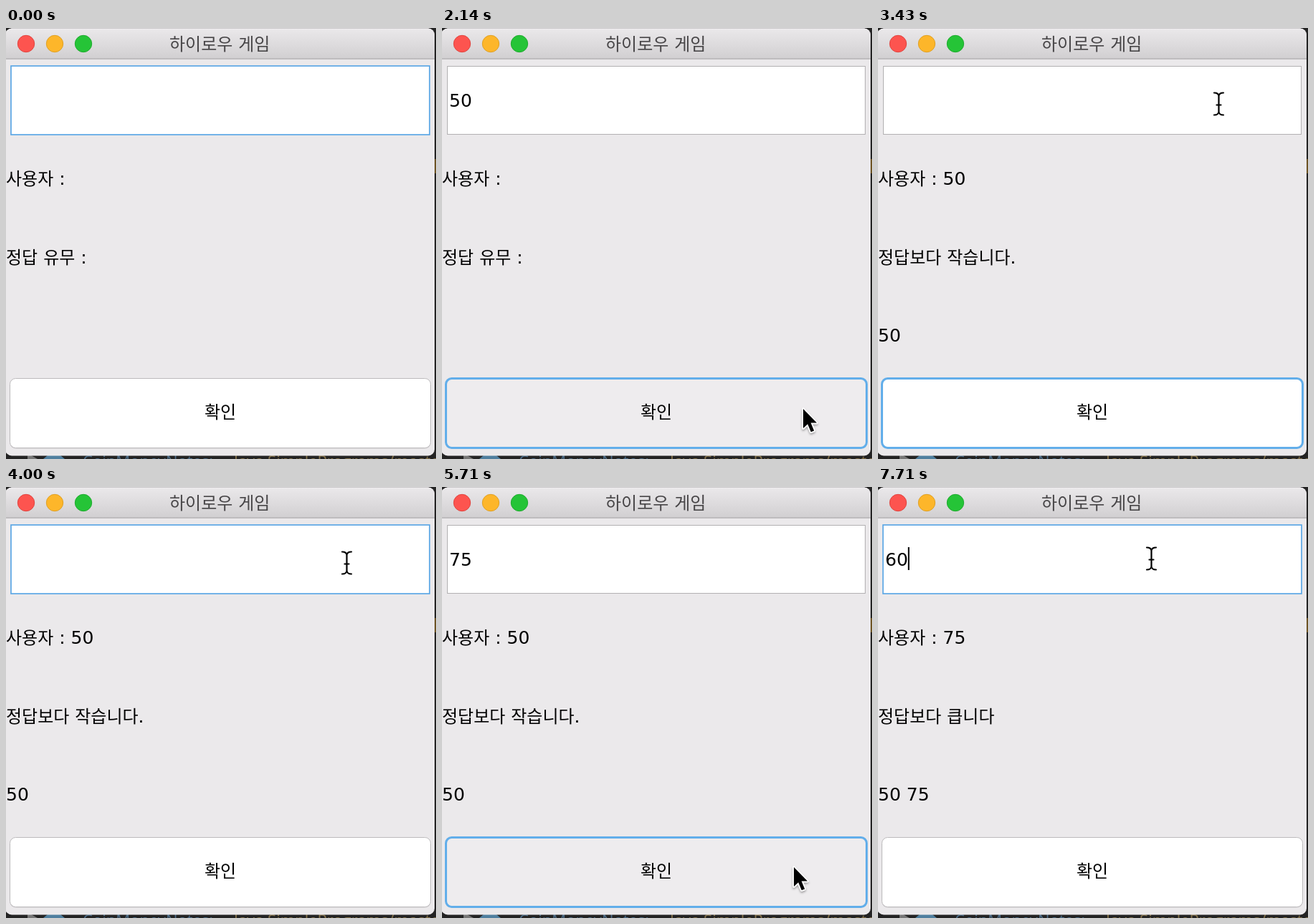
Recreate the animation shown at these times as an HTML page. Size 600x602 px, loop 8000 ms.

```html
<!DOCTYPE html>
<html lang="ko">
<head>
<meta charset="utf-8">
<title>하이로우 게임</title>
<style>
  html, body { margin: 0; width: 100%; height: 100%; overflow: hidden; background: #232323; }
  svg { display: block; }
  text { font: 25px "DejaVu Sans", "Noto Sans CJK KR", sans-serif; white-space: pre; }
  .ko { font: 24px "Noto Sans CJK KR", "Noto Sans CJK", sans-serif; }
  .behind { font: 22px "Open Sans", sans-serif; }
</style>
</head>
<body>
<svg width="600" height="602" viewBox="0 0 600 602">
  <defs>
    <linearGradient id="bar" x1="0" y1="0" x2="0" y2="1">
      <stop offset="0" stop-color="#ebe9eb"/>
      <stop offset="1" stop-color="#d1cfd1"/>
    </linearGradient>
    <clipPath id="win"><rect x="-1" y="0.5" width="599" height="597" rx="9"/></clipPath>
    <filter id="soft" x="-50%" y="-50%" width="200%" height="200%">
      <feDropShadow dx="0" dy="2" stdDeviation="1.5" flood-opacity="0.35"/>
    </filter>
  </defs>

  <!-- desktop showing behind the window -->
  <rect width="600" height="602" fill="#232323"/>
  <rect x="598" y="183" width="2" height="20" fill="#6d5424"/>
  <path d="M30 594l14 8l-14 8z" fill="#777"/>
  <path d="M52 602l6-5h18l6 5z" fill="#4f7f9f"/>
  <text class="behind" x="107" y="613" fill="#4c6c88">CoinMoneyNotes:</text>
  <text class="behind" x="318" y="613" fill="#84714a">Java SimplePrograms/master</text>

  <g clip-path="url(#win)">
    <rect width="600" height="602" fill="#ebe9eb"/>
    <rect width="600" height="43" fill="url(#bar)"/>
    <rect y="42.5" width="600" height="1.2" fill="#acaaac"/>
    <rect y="0.5" width="600" height="1" fill="#f5f3f5"/>
  </g>
  <g stroke-width="1">
    <circle cx="28" cy="22" r="11.7" fill="#fd544f" stroke="#e0443f"/>
    <circle cx="68" cy="22" r="11.7" fill="#fdb62a" stroke="#dfa023"/>
    <circle cx="108" cy="22" r="11.7" fill="#25c437" stroke="#1dab2d"/>
  </g>
  <text id="title" x="228" y="31" fill="#474547"></text>

  <rect id="field" fill="#fff"/>
  <text id="entry" x="10" y="110"></text>
  <rect id="caret" y="84" width="2" height="32"/>

  <text id="user" x="0" y="219"></text>
  <text id="verdict" x="0" y="329"></text>
  <text id="history" x="0" y="438"></text>

  <rect x="5.5" y="490.5" width="587" height="97" rx="8" fill="#cfcdcf"/>
  <rect id="button" x="5.5" y="489.5" width="587" height="97" rx="8"/>
  <text id="ok" x="277" y="545"></text>

  <g id="arrow" filter="url(#soft)">
    <path d="M1 1V28L7.2 22.3L11.8 33.2L16.2 31.4L11.6 20.6H20Z"
      stroke="#fff" stroke-width="3.4" stroke-linejoin="round" paint-order="stroke"/>
  </g>
  <g id="beam" fill="none" stroke-linecap="round">
    <path id="beamPath" stroke="#fff" stroke-width="4.6"
      d="M-6.5 -15.5Q-0.5 -15.5 0 -11Q0.5 -15.5 6.5 -15.5M0 -11V11M-6.5 15.5Q-0.5 15.5 0 11Q0.5 15.5 6.5 15.5M-3 1.5H3"/>
    <use href="#beamPath" id="beamInk"/>
    <path stroke="#000" stroke-width="2.2"
      d="M-6.5 -15.5Q-0.5 -15.5 0 -11Q0.5 -15.5 6.5 -15.5M0 -11V11M-6.5 15.5Q-0.5 15.5 0 11Q0.5 15.5 6.5 15.5M-3 1.5H3"/>
  </g>
</svg>
<script>
const LOOP = 8000, RATE = 7 / 1000;   // the picture advances seven times a second
const $ = id => document.getElementById(id);
const set = (el, attrs) => { for (const k in attrs) el.setAttribute(k, attrs[k]); };
const show = (el, on) => set(el, { visibility: on ? 'visible' : 'hidden' });
const write = (id, s) => {
  $(id).innerHTML = s.replace(/[가-힣]+/g, '<tspan class="ko">$&</tspan>');
};

// Each list holds [tick, value], valid until the next entry.
const entry = [[0, ''], [4, '5'], [6, '50'], [16, ''], [33, '7'], [34, '75'],
  [41, ''], [53, '6'], [54, '60']];
const caret = [[0, 0], [1, 1], [9, 0], [12, 1], [15, 0], [25, 1], [28, 0], [32, 1],
  [38, 0], [40, 0], [49, 1]];
const focus = [[0, 'field'], [15, 'button'], [25, 'field'], [40, 'button'], [49, 'field']];
const pressed = [[0, 0], [15, 1], [16, 0], [40, 1], [41, 0]];
const labels = [
  [0, ['', '정답 유무 :', '']],
  [16, ['50', '정답보다 작습니다.', '50']],
  [41, ['75', '정답보다 큽니다', '50 75']]
];
// Pointer stops: [tick, x, y]
const route = [[12, 566, 440], [14, 503, 531], [16, 503, 531], [23, 475.5, 106],
  [32, 475.5, 106], [33, 476.5, 104.5], [36, 476.5, 104.5], [39, 490, 530],
  [41, 490, 530], [44, 378, 64], [45, 377.5, 58], [46, 380, 88], [47, 381.5, 100]];

const at = (list, n) => list.filter(e => e[0] <= n).pop()[1];

function pointer(n) {
  const i = route.findIndex(p => p[0] > n);
  if (i === 0) return null;
  if (i < 0) return route[route.length - 1].slice(1);
  const [t0, x0, y0] = route[i - 1], [t1, x1, y1] = route[i];
  const u = (n - t0) / (t1 - t0), e = u * u * (3 - 2 * u);
  return [x0 + (x1 - x0) * e, y0 + (y1 - y0) * e];
}

function draw(n) {
  const text = at(entry, n), focused = at(focus, n);
  write('entry', text);
  set($('caret'), { x: text ? 10 + 15.9 * text.length : 11 });
  show($('caret'), at(caret, n));

  set($('field'), focused === 'field'
    ? { x: 7, y: 53, width: 584, height: 96, stroke: '#5ca7e5', 'stroke-width': 1.7 }
    : { x: 7.5, y: 53.5, width: 583, height: 95, stroke: '#b2b0b2', 'stroke-width': 1 });
  set($('button'), {
    fill: at(pressed, n) ? '#eeecee' : '#fff',
    stroke: focused === 'button' ? '#62aeea' : '#bcbabc',
    'stroke-width': focused === 'button' ? 3 : 1
  });

  const [user, verdict, history] = at(labels, n);
  write('user', '사용자 : ' + user);
  write('verdict', verdict);
  write('history', history);

  const p = pointer(n);
  const inField = p && p[1] > 53 && p[1] < 149;
  show($('arrow'), p && !inField);
  show($('beam'), inField);
  if (p) set($(inField ? 'beam' : 'arrow'), { transform: `translate(${p})` });
}

$('beamInk').remove();
write('title', '하이로우 게임');
write('ok', '확인');

const start = performance.now();
let last = -1;
function loop() {
  const t = (performance.now() - start) % LOOP;
  const n = Math.floor((t + 5) * RATE) % 56;
  if (n !== last) draw(last = n);
  requestAnimationFrame(loop);
}
loop();
</script>
</body>
</html>
```
